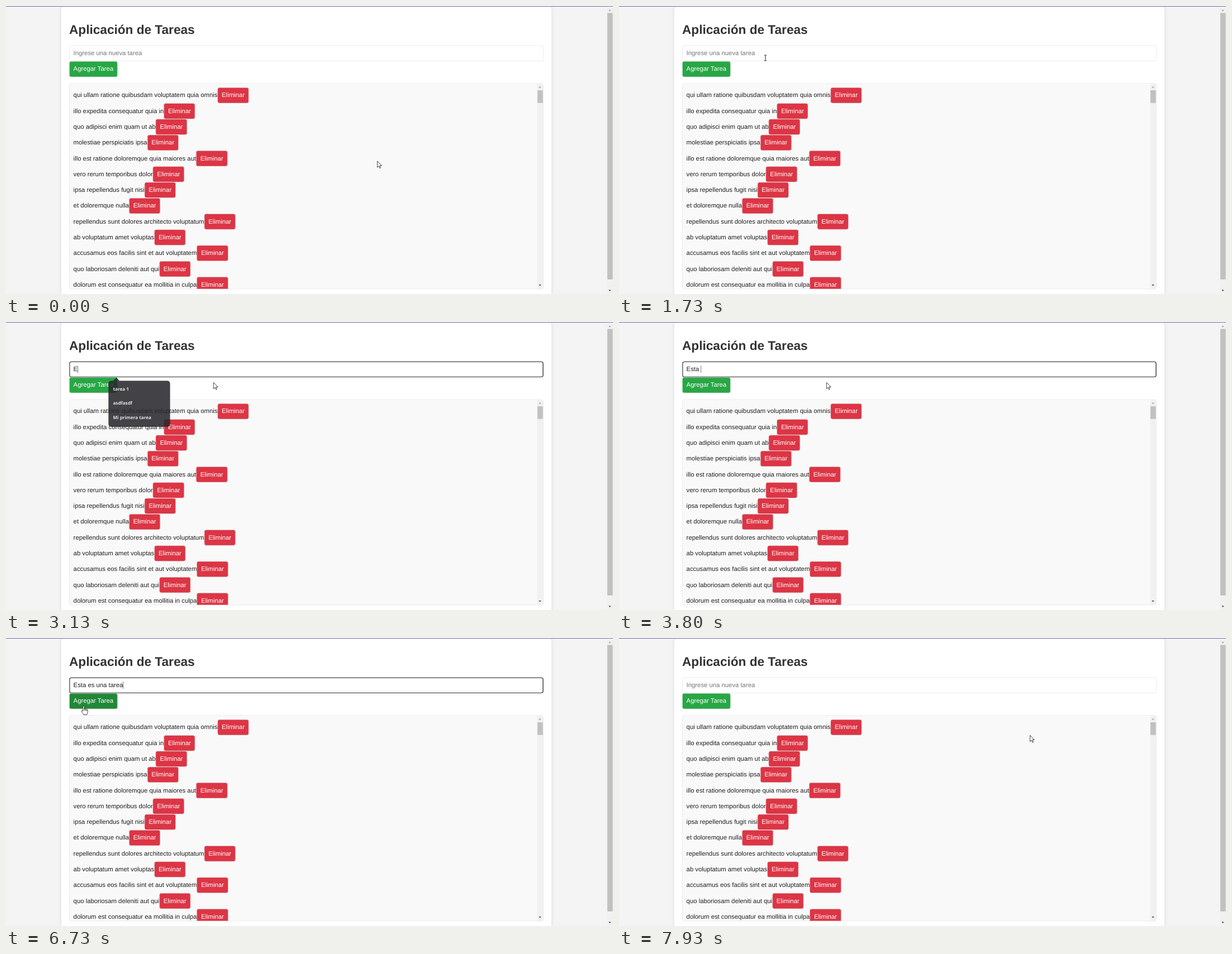
Recreate the animation shown at these times as an HTML page. Size 1086 by 516 pixels, loop 8000 ms.

```html
<!DOCTYPE html>
<html lang="es">
<head>
<meta charset="utf-8">
<title>Aplicación de Tareas</title>
<style>
html, body { margin: 0; width: 100%; height: 100%; overflow: hidden; background: #f4f4f4; }
/* a 1920px wide screen at 125%, shrunk to the stage */
#page {
  position: absolute; left: 0; top: 0; width: 1536px; height: 730px; overflow: hidden;
  zoom: 1.25; transform: scale(.565625); transform-origin: 0 0;
  font: 16px "Liberation Sans", Arial, sans-serif; color: #212121;
  text-rendering: geometricPrecision; white-space: nowrap; cursor: default;
}
#page > * { position: absolute; }
#top { left: 0; top: 0; width: 100%; height: 1.41px; background: #7f76b8; }
#card {
  left: 139.8px; top: .8px; width: 1200px; height: 800px; padding: 0 20px; background: #fff;
  border-radius: 8px; box-shadow: 0 0 10px rgba(0, 0, 0, .1);
}
h1 { margin: 0; padding: 20px 0 0; font-size: 32px; color: #333; }
h1 span { display: block; margin: .67em 0; }
.field, .btn, #list { border: 1px solid #ddd; border-radius: 5px; padding: 10px; }
.field { display: flex; background: #fff; }
.field.focus { border-color: #101010; box-shadow: inset 0 0 0 1px #101010; }
.field.empty #typed { color: #757575; }
#typed { white-space: pre; }
#caret { width: 1px; margin-right: -1px; background: #111; }
.btn { width: fit-content; color: #fff; }
.add { background: #28a745; }
.add.hover { background: #218838; }
.del { background: #dc3545; }
.del.hover { background: #c82333; }
#list { position: relative; height: 500px; margin-top: 16px; background: #f9f9f9; overflow: hidden; }
.row { display: flex; align-items: center; }
.bar { position: absolute; right: 0; top: 0; bottom: 0; width: 15px; background: #f1f1f1; }
.bar::before, .bar::after { content: ""; position: absolute; left: 4px; border: solid transparent; border-width: 0 3.5px; }
.bar::before { top: 7px; border-bottom: 4px solid #a3a3a3; }
.bar::after { bottom: 7px; border-top: 4px solid #505050; }
.bar i { position: absolute; left: .5px; right: 1px; background: #c1c1c1; }
#popup {
  left: 258.8px; top: 148.5px; width: 132px; height: 107px; border-radius: 7px;
  background: rgba(40, 38, 44, .87); color: #e4e4e6; padding: 5px 12px;
  font: 700 11.5px/35.6px "Open Sans", "Noto Sans", sans-serif;
}
#popup::before {
  content: ""; position: absolute; left: 12px; top: -8px;
  border: solid transparent; border-width: 0 8px 8px; border-bottom-color: rgba(40, 38, 44, .87);
}
#popup, #mouse { pointer-events: none; }
#mouse { left: 0; top: 0; width: 1px; height: 1px; overflow: visible; }
#mouse path { fill: #fff; stroke: #111; stroke-width: 1.1; stroke-linejoin: round; }
#mouse .text { fill: none; stroke-width: 1.4; }
</style>
</head>
<body>
<div id="page">
  <div id="card">
    <h1><span>Aplicación de Tareas</span></h1>
    <div class="field" id="field"><span id="typed"></span><span id="caret"></span></div>
    <div class="btn add">Agregar Tarea</div>
    <div id="list"><div class="bar"><i style="top:17px;height:32px"></i></div></div>
  </div>
  <div id="top"></div>
  <div class="bar" style="top:1.4px"><i style="top:16.5px;height:675px"></i></div>
  <div id="popup"><div>tarea 1</div><div>asdfasdf</div><div>Mi primera tarea</div></div>
  <svg id="mouse">
    <path class="arrow" d="M.5 .5V16.5L4.200 12.900 6.700 18.600 9 17.600 6.600 12H11.600Z"/>
    <path class="text" d="M-3-7h2.200l.8.8.8-.8H3M0-6.200V6.200M-3 7h2.200l.8-.8.8.8H3"/>
    <path class="hand" d="M-2 13V1.500a1.700 1.700 0 0 1 3.400 0V8c.5-1.600 3-1.400 3.200.3 .6-1.200 2.800-.9 2.900.7 .8-.9 2.600-.4 2.600 1.200V15c0 3-2 4-2 7H0c0-2.500-5-6-5.500-8.500-.3-2 1.700-2.500 3.500-.5zM1.400 8v4M4.600 8.300v4M7.500 9v3.500"/>
  </svg>
</div>
<script>
const $ = s => document.querySelector(s);
const SCALE = 1086 / 1536, LOOP = 8000, TICK = 1000 / 15;

const tasks = [
  'qui ullam ratione quibusdam voluptatem quia omnis', 'illo expedita consequatur quia in',
  'quo adipisci enim quam ut ab', 'molestiae perspiciatis ipsa',
  'illo est ratione doloremque quia maiores aut', 'vero rerum temporibus dolor',
  'ipsa repellendus fugit nisi', 'et doloremque nulla',
  'repellendus sunt dolores architecto voluptatum', 'ab voluptatum amet voluptas',
  'accusamus eos facilis sint et aut voluptatem', 'quo laboriosam deleniti aut qui',
  'dolorum est consequatur ea mollitia in culpa'
];
for (const task of tasks) {
  const row = document.createElement('div');
  row.className = 'row';
  row.innerHTML = `<span>${task}</span><div class="btn del">Eliminar</div>`;
  $('#list').append(row);
}

const message = 'Esta es una tarea';
const keyTimes = [3130, 3260, 3400, 3530, 3800, 3930, 4000, 4130, 4200,
  4400, 4530, 4600, 4800, 4930, 5070, 5130, 5270];
const FOCUS = 1800, BLUR = 6860, CLEAR = 7000, BLINK = 530;

// start, end, then the four Bezier points of the pointer path
const moves = [
  [533, 1400, 664, 277.5, 610, 400, 340, 400, 257, 128],
  [1400, 1733, 257, 128, 256, 115, 260, 100, 262, 93],
  [1867, 2267, 262, 93, 275, 93, 295, 90, 308, 90],
  [2267, 2600, 308, 90, 330, 91, 360, 100, 371, 108],
  [6133, 6733, 371, 108, 310, 106, 190, 118, 139, 122],
  [7133, 7333, 139, 122, 165, 100, 200, 82, 250, 82],
  [7333, 7933, 250, 82, 400, 82, 690, 450, 735, 174]
];

const clamp = v => Math.max(0, Math.min(1, v));
const ease = v => v * v * (3 - 2 * v);
const ramp = (t, a, b) => ease(clamp((t - a) / (b - a)));
const bezier = (u, a, b, c, d) =>
  (1 - u) ** 3 * a + 3 * u * (1 - u) ** 2 * b + 3 * u * u * (1 - u) * c + u ** 3 * d;

function pointer(t) {
  const [a, b, x0, y0, x1, y1, x2, y2, x3, y3] = moves.findLast(m => t >= m[0]) || moves[0];
  const u = ramp(t, a, b);
  return [bezier(u, x0, x1, x2, x3), bezier(u, y0, y1, y2, y3)];
}

function drawField(t) {
  const pressed = keyTimes.filter(k => t >= k);
  const count = t < CLEAR ? pressed.length : 0;
  const focus = t >= FOCUS && t < BLUR;
  const since = Math.max(FOCUS - 60, ...pressed);
  const lit = focus && Math.floor((t - since) / BLINK) % 2 === 0;
  $('#field').className = 'field' + (focus ? ' focus' : '') + (count ? '' : ' empty');
  $('#typed').textContent = count ? message.slice(0, count) : 'Ingrese una nueva tarea';
  const caret = $('#caret').style;
  caret.visibility = lit ? 'visible' : 'hidden';
  // with no text the caret stands before the placeholder
  caret.order = count ? 1 : -1;
}

function drawPopup(t) {
  const enter = ramp(t, 1800, 2133), leave = ramp(t, 3133, 3467);
  const style = $('#popup').style;
  style.opacity = enter * (1 - leave);
  style.transform = `translateY(${(1 - enter) * 31 + leave * 8}px)`;
}

function drawMouse(t) {
  const [x, y] = pointer(t);
  const hit = document.elementFromPoint(x, y);
  const over = s => hit && hit.closest(s);
  const button = over('.btn');
  const kind = button ? 'hand' : over('.field, .row span') ? 'text' : 'arrow';
  document.querySelectorAll('.btn').forEach(b => b.classList.toggle('hover', b === button));
  document.querySelectorAll('#mouse path').forEach(p => {
    p.style.display = p.classList.contains(kind) ? '' : 'none';
  });
  $('#mouse').style.transform = `translate(${x / SCALE}px, ${y / SCALE}px)`;
}

function draw(now) {
  const t = Math.floor((now % LOOP + 4) / TICK) * TICK;
  drawField(t);
  drawPopup(t);
  drawMouse(t);
}

let start;
function loop(now) {
  start ??= now;
  draw(now - start);
  requestAnimationFrame(loop);
}
draw(0);
requestAnimationFrame(loop);
</script>
</body>
</html>
```
